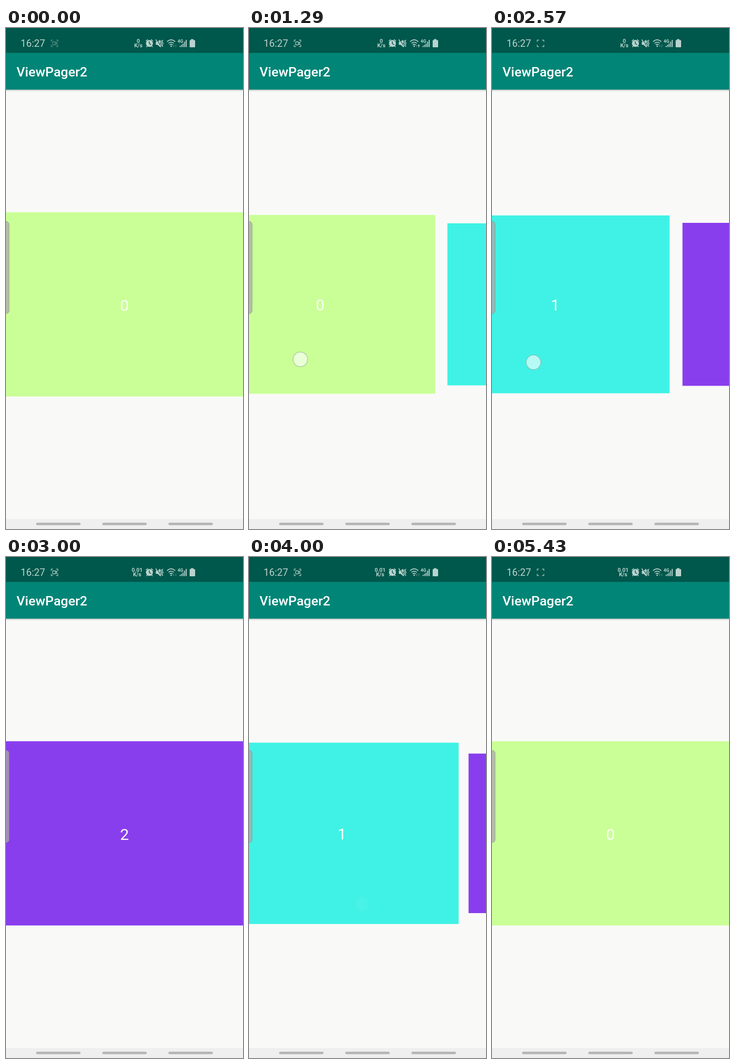
An HTML page for the animation above (5.71 s loop, 480 by 1013 pixels).

```html
<!DOCTYPE html>
<html lang="en">
<head>
<meta charset="utf-8">
<title>ViewPager2</title>
<style>
  html, body { margin: 0; width: 100%; height: 100%; overflow: hidden; background: #f9faf8; }
  svg { display: block; width: 100vw; height: 100vh; font-family: Roboto, sans-serif; }
  .digit { font-size: 32px; fill: #fafffa; text-anchor: middle; }
  .icons { fill: #b9d3ce; stroke: none; }
  .line { fill: none; stroke: #b9d3ce; stroke-width: 1.6; }
  .cut { fill: none; stroke: #00574b; stroke-width: 1.5; }
  .speed { font-size: 11px; font-weight: 700; text-anchor: middle; }
</style>
</head>
<body>
<svg viewBox="0 0 480 1013">
  <defs>
    <linearGradient id="shade" x2="0" y2="1">
      <stop offset="0" stop-color="#000" stop-opacity=".2"/>
      <stop offset="1" stop-color="#000" stop-opacity="0"/>
    </linearGradient>
  </defs>
  <rect width="480" height="1013" fill="#f9faf8"/>

  <g id="pages"></g>

  <rect x="-10" y="391" width="16.3" height="186.5" rx="6" fill="#aaa" fill-opacity=".75" stroke="#858585" stroke-opacity=".6"/>
  <circle id="touch" r="14.8" fill="#fff" fill-opacity=".62" stroke="#88a59c" stroke-opacity=".55" stroke-width="1.6"/>

  <rect y="124" width="480" height="5" fill="url(#shade)"/>
  <rect y="50" width="480" height="74.7" fill="#008577"/>
  <rect width="480" height="50.3" fill="#00574b"/>
  <text x="21.3" y="97.5" font-size="26.67" font-weight="500" fill="#fff">ViewPager2</text>

  <g class="icons">
    <text x="29.5" y="38" font-size="20">16:27</text>
    <g id="rec" fill="none" stroke="#a3c5bf" stroke-width="1.3">
      <path d="M91.5 28v-3.5h3.5M101.500 24.500h3.500v3.500M105 34v3.500h-3.500M95 37.500h-3.500v-3.500"/>
      <path id="cam" d="M94.500 28h5.500v6h-5.500zM100 30.500l3-2v5l-3-2"/>
    </g>
    <g id="speed" class="speed">
      <text id="rate" y="30">0</text>
      <text y="39.300">K/s</text>
    </g>

    <circle cx="290.500" cy="31.300" r="7"/>
    <path class="line" d="M283.300 26.500l4-3.500M297.700 26.500l-4-3.500M286 36.500l-1.800 2M295 36.500l1.800 2"/>
    <path class="cut" d="M290.300 27v4.600l3.500 2"/>

    <path d="M303.500 28h3.500l5-4.500v15l-5-4.500h-3.500z"/>
    <path class="cut" d="M304.500 23l10 15.500"/>
    <path class="line" d="M303.300 23.300l10 15.400M314.600 25l-1.500 3 1.800 3-1.800 3 1.500 3M317.700 24l-1.500 3.500 1.800 3.500-1.800 3.500 1.500 3.500"/>

    <path class="line" d="M326.300 27.600q8.200-7.400 16.400 0M329 31q5.500-4.800 11 0M331.500 34.200q3-2.500 6 0"/>
    <circle cx="334.500" cy="36.700" r="1.500"/>
    <path fill="#39786e" d="M338.600 33v3h-1.600l2.300 3 2.300-3h-1.600v-3z"/>
    <path id="up" d="M343.200 39v-3h-1.500l2.200-3 2.200 3h-1.500v3z"/>

    <text x="347.500" y="30" font-size="9" font-weight="700">4G</text>
    <path d="M351.700 36h1.800v2.500h-1.800zM354.700 34h1.800v4.500h-1.800zM357.700 31.500h1.800v7h-1.800zM360.800 27.500h1.900v11h-1.900zM364 24h1.900v14.500h-1.900z"/>
    <path d="M374.500 22.500h5v2h2.500q1 0 1 1v12.500q0 1-1 1h-9q-1 0-1-1v-12.500q0-1 1-1h1.500z"/>
  </g>

  <rect y="993" width="480" height="20" fill="#efefef"/>
  <g fill="#b5b5b5">
    <rect x="61" y="1000.300" width="90" height="5" rx="2.500"/>
    <rect x="195" y="1000.300" width="90" height="5" rx="2.500"/>
    <rect x="329" y="1000.300" width="90" height="5" rx="2.500"/>
  </g>
</svg>

<script>
const LOOP = 5710, RATE = 7;      // ms, picture steps per second
const WIDTH = 480, MID = 558.75, MARGIN = 40 / 3, SHRINK = 0.15;

const $ = id => document.getElementById(id);

// [step, scroll position in pages]
const scroll = [
  [7, 0], [8, .04], [9, .197], [10, .47], [11, .8395], [12, .98], [13, 1],
  [16, 1], [17, 1.05], [18, 1.231], [19, 1.63], [20, 1.92], [21, 2],
  [24, 2], [25, 1.98], [26, 1.86], [27, 1.5], [28, 1.1055], [29, 1],
  [32, 1], [33, .98], [34, .86], [35, .5], [36, .11], [37, 0]
];

// Each swipe: [step, x, y, opacity]
const swipes = [
  [[7, 208, 668, .7], [8, 182, 672, 1], [9, 104, 670, 1], [10, 45, 655, .9], [11, 38, 653, .13]],
  [[16, 206, 682, .7], [17, 170, 681, 1], [18, 84, 676, 1], [19, 36, 666, .7]],
  [[24, 84, 690, .7], [25, 100, 692, 1], [26, 162, 698, 1], [27, 226, 702, .8], [28, 229, 702, .08]],
  [[32, 84, 690, .7], [33, 100, 692, 1], [34, 162, 698, 1], [35, 226, 702, .8], [36, 229, 702, .08]]
];

function sample(keys, step, field) {
  let a = keys[0];
  for (const b of keys) {
    if (step < b[0]) {
      if (a === b) return b[field];
      return a[field] + (b[field] - a[field]) * (step - a[0]) / (b[0] - a[0]);
    }
    a = b;
  }
  return a[field];
}

$('pages').innerHTML = ['#caff97', '#40f2e5', '#893eed'].map((color, i) =>
  `<g><rect y="372.5" width="480" height="372.5" fill="${color}"/>
   <text class="digit" x="240" y="571.7">${i}</text></g>`).join('');
const pages = [...$('pages').children];

function drawPages(current) {
  pages.forEach((page, i) => {
    const pos = i - current;
    const scale = 1 - SHRINK * Math.abs(pos);
    const pivot = WIDTH / 2 * (1 - pos);
    const x = (WIDTH + MARGIN) * pos + pivot * (1 - scale);
    page.setAttribute('transform', `translate(${x} ${MID * (1 - scale)}) scale(${scale})`);
    page.style.display = Math.abs(pos) < 1 ? '' : 'none';
  });
}

function drawTouch(step) {
  const swipe = swipes.find(s => step >= s[0][0] && step <= s[s.length - 1][0]);
  const touch = $('touch');
  touch.style.display = swipe ? '' : 'none';
  if (!swipe) return;
  touch.setAttribute('cx', sample(swipe, step, 1));
  touch.setAttribute('cy', sample(swipe, step, 2));
  touch.style.opacity = sample(swipe, step, 3);
}

function drawStatus(step) {
  const busy = step >= 19;
  $('rec').style.opacity = Math.min(1, .5 + step / 6);
  $('cam').style.display = (step >= 10 && step < 20) || step >= 31 ? 'none' : '';
  $('rate').textContent = busy ? '0.01' : '0';
  $('speed').setAttribute('transform', `translate(${busy ? 265.5 : 268} 0)`);
  $('up').style.fill = step >= 8 && step < 13 ? '#b9d3ce' : '#39786e';
}

const start = performance.now();
function frame() {
  const time = (performance.now() - start) % LOOP;
  const step = Math.floor((time + 3.5) * RATE / 1000);
  drawPages(sample(scroll, step, 1));
  drawTouch(step);
  drawStatus(step);
  requestAnimationFrame(frame);
}
frame();
</script>
</body>
</html>
```
